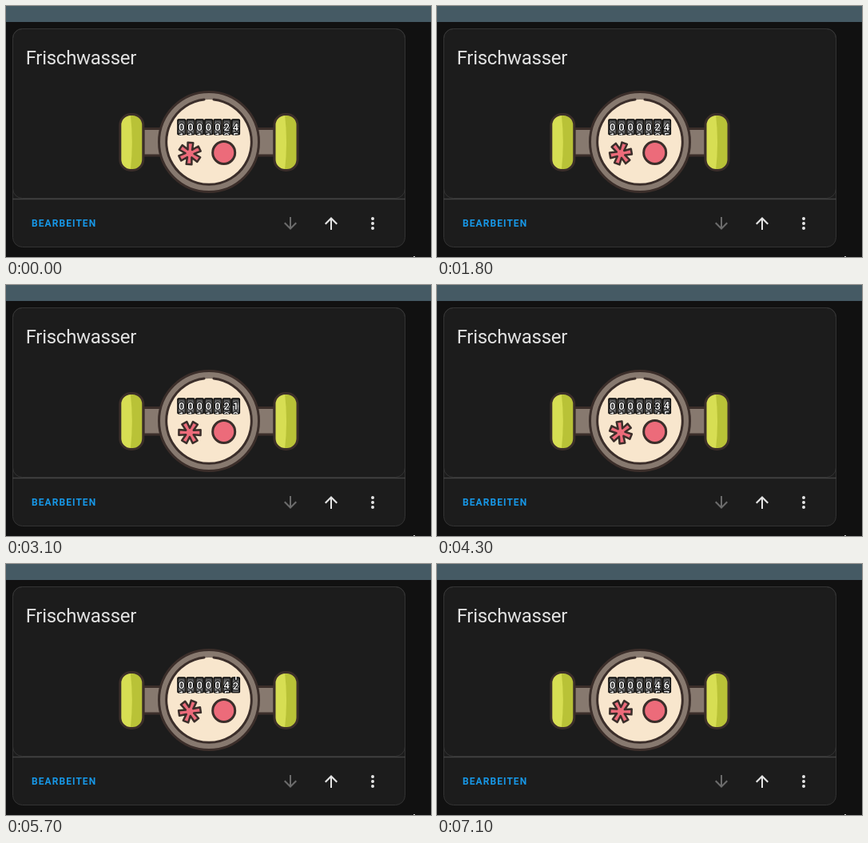
These frames come from a looping animation (532x314 px, 7.2 s). An HTML page:

```html
<!DOCTYPE html>
<html lang="de">
<head>
<meta charset="utf-8">
<style>
  html, body { margin: 0; width: 100%; height: 100%; overflow: hidden; background: #111; }
  svg { display: block; font-family: Roboto, sans-serif; }
  .line { stroke: #3b2e2a; stroke-width: 3; }
  .digit { font: 500 13px Roboto, sans-serif; fill: #fff; stroke: #080808; stroke-width: 2; paint-order: stroke; text-anchor: middle; }
</style>
</head>
<body>
<svg width="532" height="314" viewBox="0 0 532 314">
  <defs>
    <linearGradient id="drum" x2="0" y2="1">
      <stop stop-color="#333"/>
      <stop offset=".5" stop-color="#b0b0b0"/>
      <stop offset="1" stop-color="#555"/>
    </linearGradient>
    <clipPath id="window"><rect x="214" y="141" width="80" height="20.5"/></clipPath>
    <path id="arrow" fill="currentColor" d="M1 8H-1V-4L-6.5 1.5L-8 0L0-8L8 0L6.5 1.5L1-4Z"/>
    <g id="valve">
      <rect width="29" height="70" rx="13.5" fill="#b9c237"/>
      <path d="M13 0Q0 1 0 14V56Q0 69 13 70Q17 35 13 0Z" fill="#d7de53"/>
      <rect class="line" width="29" height="70" rx="13.5" fill="none"/>
    </g>
  </defs>

  <rect width="532" height="20" fill="#455a64"/>
  <rect x="8.5" y="28.5" width="491" height="273" rx="12" fill="#1c1c1c" stroke="#333"/>
  <rect x="8.5" y="28.5" width="491" height="212" rx="12" fill="none" stroke="#333"/>
  <path d="M8 241.5H500" stroke="#404040" stroke-width="1.5"/>
  <path d="M510 313.5h2" stroke="#ccc"/>
  <text x="24.7" y="73" font-size="24" letter-spacing="-.288" fill="#e1e1e1">Frischwasser</text>
  <text x="32" y="276" font-size="12" font-weight="600" letter-spacing="1.07" fill="#1797e6">BEARBEITEN</text>
  <use href="#arrow" transform="translate(356 272) rotate(180)" color="#6b6b6b"/>
  <use href="#arrow" transform="translate(407 272)" color="#e4e4e4"/>
  <path d="M459 266h0M459 272h0M459 278h0" stroke="#e4e4e4" stroke-width="4" stroke-linecap="round"/>

  <path class="line" d="M172 153.5H336V187H172Z" fill="#87796f"/>
  <use href="#valve" x="142.8" y="135.5"/>
  <use href="#valve" x="336" y="135.5"/>
  <circle class="line" cx="254" cy="170" r="62.5" fill="#87796f"/>
  <circle cx="254" cy="170" r="53" fill="#f8e6cd"/>
  <path class="line" d="M260 117A53.3 53.3 0 1 1 248 117" fill="none" stroke-linecap="round"/>
  <circle class="line" cx="272.7" cy="183.5" r="14" fill="#ec6b7a"/>
  <path id="wheel" stroke="#3b2e2a" stroke-width="2.5" stroke-linejoin="round" fill="#ec6b7a"/>
  <g id="counter" clip-path="url(#window)"></g>
</svg>
<script>
  const LOOP = 7200, DRUMS = 7, PITCH = 11.3, ROW = 12;
  const UPDATES = [100, 800, 1800, 2200, 2600, 3400, 4300, 4700, 5500, 6300, 6700, 7100];
  const svg = document.querySelector('svg');
  const wheel = document.getElementById('wheel');
  const counter = document.getElementById('counter');

  const clamp = (value, low, high) => Math.min(high, Math.max(low, value));
  const easeOut = p => 1 - (1 - p) ** 3;
  const easeInOut = p => p * p * (3 - 2 * p);

  function add(parent, name, attributes) {
    const node = document.createElementNS(svg.namespaceURI, name);
    for (const key in attributes) node.setAttribute(key, attributes[key]);
    return parent.appendChild(node);
  }

  function polar(radius, degrees) {
    const a = degrees * Math.PI / 180;
    return `${(radius * Math.cos(a)).toFixed(2)} ${(radius * Math.sin(a)).toFixed(2)}`;
  }

  // Six blunt arms joined at the hub.
  const arms = Array.from({ length: 6 }, (_, i) =>
    [polar(5.5, i * 60 - 30), polar(14, i * 60 - 14), polar(14, i * 60 + 14)].join('L'));
  wheel.setAttribute('d', `M${arms.join('L')}Z`);

  const drums = Array.from({ length: DRUMS }, (_, i) => {
    const x = 214 + i * PITCH;
    add(counter, 'rect', { x: x + 1, y: 142, width: PITCH - 1.8, height: 19, rx: 1, fill: 'url(#drum)', stroke: '#090909', 'stroke-width': 1.6 });
    return [0, 1].map(() => add(counter, 'text', { x: x + PITCH / 2, class: 'digit' }));
  });

  // Reading after the given number of updates.
  const reading = count => clamp(Math.floor(23.85 + 2.7 * (count - 2)), 24, 46);

  function setDrum(cells, value) {
    const first = Math.floor(value);
    cells.forEach((cell, i) => {
      cell.textContent = (first + i) % 10;
      cell.setAttribute('y', 155.8 + (first + i - value) * ROW);
    });
  }

  drums.forEach(cells => setDrum(cells, 0));

  function draw(now) {
    const time = now % LOOP;
    const count = UPDATES.filter(start => start <= time).length;
    const start = UPDATES[count - 1] ?? 0;
    const gap = (UPDATES[count] ?? LOOP + 400) - start;
    const age = time - start;
    const from = reading(count - 1), to = reading(count);

    // The units turn at once, the tens follow later.
    const tens = Math.floor(from / 10), carry = Math.floor(to / 10) - tens;
    setDrum(drums[DRUMS - 1], from + (to - from) * easeOut(clamp(age / 300, 0, 1)));
    setDrum(drums[DRUMS - 2], tens + carry * easeInOut(clamp((age - 500) / 200, 0, 1)));

    const turn = count && count - 1 + easeInOut(clamp(age / Math.min(700, gap - 100), 0, 1));
    wheel.setAttribute('transform', `translate(230 184.5) rotate(${34 + 68 * turn})`);
    requestAnimationFrame(draw);
  }
  draw(performance.now());
</script>
</body>
</html>
```
